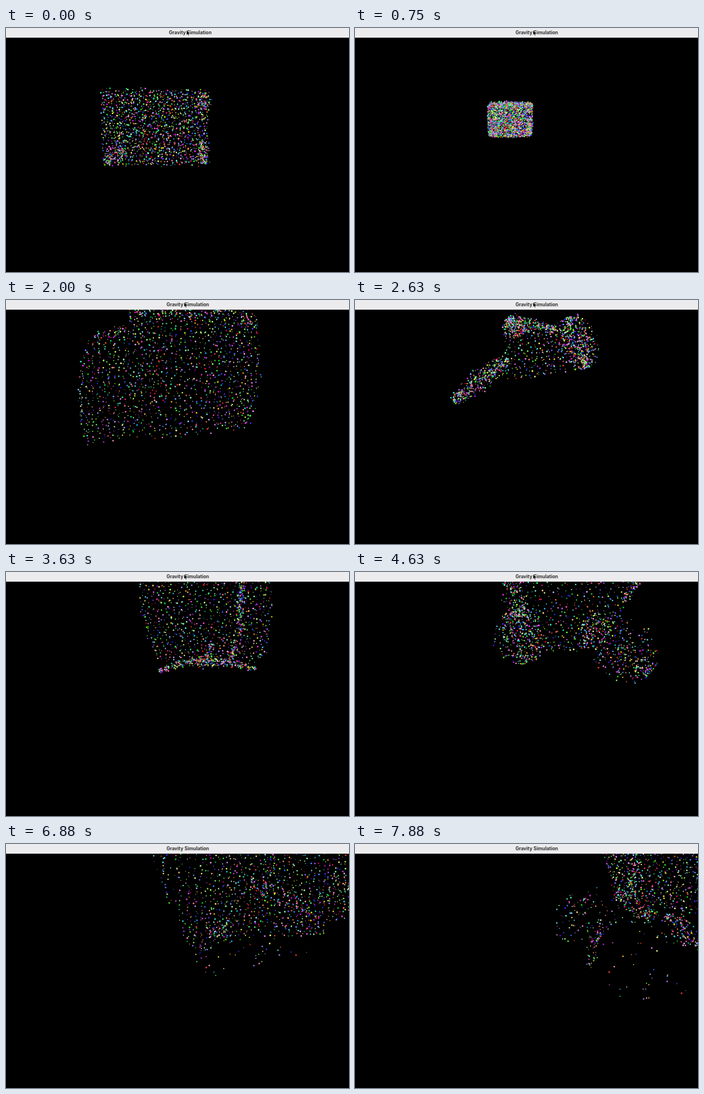
Animation of 600x429 px, one loop 8 s. Source, as an HTML page with a canvas:

```html
<!DOCTYPE html>
<html lang="en">
<head>
<meta charset="utf-8">
<title>Gravity Simulation</title>
<style>
  html, body { margin: 0; width: 100%; height: 100%; overflow: hidden; background: #000; }
  #stage { position: relative; width: 600px; height: 429px; overflow: hidden; background: #000; }
  canvas { position: absolute; left: 0; top: 0; }
  #bar { position: absolute; left: 0; top: 0; width: 600px; height: 17px; background: #ecebed; }
  #title {
    position: absolute; left: 218px; top: 0; width: 200px; text-align: center;
    font: 700 8.3px/16px Inter, "Liberation Sans", sans-serif; color: #303030; white-space: nowrap;
  }
  #cursor { position: absolute; left: 311px; top: 4px; overflow: visible; }
</style>
</head>
<body>
<div id="stage">
  <canvas id="sky" width="600" height="429"></canvas>
  <div id="bar">
    <div id="title">Gravity Simulation</div>
    <svg id="cursor" width="8" height="11">
      <path d="M.5 0V8.3L2.4 6.7 3.7 9.6 5 9 3.8 6.2H6.3Z" fill="#000" stroke="#fff" stroke-width=".5"/>
    </svg>
  </div>
</div>
<script>
const LOOP = 8000, STEP = 125, SIDE = 40, N = SIDE * SIDE;
const ctx = document.getElementById('sky').getContext('2d');
const title = document.getElementById('title');
const cursor = document.getElementById('cursor');

let seed = 20417;
function rnd() {
  seed = (seed + 0x6D2B79F5) | 0;
  let r = Math.imul(seed ^ seed >>> 15, 1 | seed);
  r = r + Math.imul(r ^ r >>> 7, 61 | r) ^ r;
  return ((r ^ r >>> 14) >>> 0) / 4294967296;
}
const spread = size => (rnd() + rnd() - 1) * size;
const lerp = (a, b, s) => a + (b - a) * s;

// An evenly filled four-cornered cloud (clockwise from top left), sides bulging outwards.
const sheet = (a, b, c, d, bulge = 0) => i => {
  const u = i * 0.754877 % 1, v = i * 0.569840 % 1;
  const at = k => lerp(lerp(a[k], b[k], u), lerp(d[k], c[k], u), v);
  return [
    at(0) + bulge * 4 * v * (1 - v) * (2 * u - 1) + spread(4),
    at(1) + bulge * 4 * u * (1 - u) * (2 * v - 1) + spread(4)
  ];
};

// A soft lens-shaped streak between two points; its share of dots follows its area.
function strand([x0, y0], [x1, y1], width, { bend = 0, density = 1 } = {}) {
  const dx = x1 - x0, dy = y1 - y0, len = Math.hypot(dx, dy);
  return {
    weight: len * width * density,
    at() {
      const s = rnd(), arch = Math.sin(Math.PI * s);
      const off = spread(width * (0.4 + 0.4 * arch)) + bend * arch;
      return [x0 + dx * s - dy / len * off, y0 + dy * s + dx / len * off];
    }
  };
}

// Fill the sheet and strands with N dots, then order them by column and row,
// so equal ranks in two poses lie in matching parts of the cloud.
function pose(sheetShare, base, ...strands) {
  const area = strands.reduce((sum, p) => sum + p.weight, 0);
  const points = [];
  for (const p of strands) {
    const count = Math.round(N * (1 - sheetShare) * p.weight / area);
    for (let i = 0; i < count; i++) points.push(p.at());
  }
  for (let i = 1; points.length < N; i++) points.push(base(i));
  points.sort((a, b) => a[0] - b[0]);
  const ranked = [];
  for (let i = 0; i < N; i += SIDE)
    ranked.push(...points.slice(i, i + SIDE).sort((a, b) => a[1] - b[1]));
  return ranked;
}

const block = pose(0.84,
  sheet([166, 107], [354, 110], [354, 240], [169, 242]),
  strand([345, 114], [347, 144], 20),
  strand([342, 200], [346, 239], 22),
  strand([174, 236], [206, 213], 22));

const disc = pose(0.87,
  sheet([164, 40], [405, 40], [396, 248], [160, 252], 14),
  strand([170, 42], [400, 42], 20),
  strand([393, 38], [407, 56], 24));

const wings = pose(0.14,
  sheet([264, 38], [362, 46], [368, 126], [262, 142]),
  strand([373, 30], [404, 120], 48),
  strand([266, 32], [294, 60], 38),
  strand([268, 36], [352, 52], 18),
  strand([268, 103], [172, 178], 28));

const dome = pose(0.68,
  sheet([240, -40], [450, -40], [452, 152], [262, 152], 16),
  strand([267, 174], [437, 171], 13, { bend: -16 }),
  strand([412, 12], [410, 112], 11),
  strand([362, 126], [345, 156], 10),
  strand([402, 120], [392, 158], 10));

const split = pose(0.34,
  sheet([260, -50], [540, -50], [430, 135], [310, 140]),
  strand([268, 8], [290, 80], 30),
  strand([276, 68], [307, 158], 66),
  strand([404, 84], [518, 176], 78, { density: 0.6 }),
  strand([496, 10], [470, 52], 16));

const sail = pose(0.78,
  sheet([190, -60], [640, -60], [556, 138], [284, 210]),
  strand([432, 10], [416, 74], 14),
  strand([384, 63], [522, 106], 16),
  strand([516, 106], [582, 48], 18),
  strand([282, 206], [345, 180], 28));

const drift = pose(0.62,
  sheet([420, -40], [690, -40], [670, 140], [452, 92]),
  strand([493, 8], [482, 95], 15),
  strand([452, 88], [524, 130], 28),
  strand([545, 124], [606, 180], 30),
  strand([370, 95], [432, 165], 85, { density: 0.25 }),
  strand([428, 135], [411, 218], 16, { density: 0.6 }),
  strand([515, 110], [515, 280], 140, { density: 0.04 }));

// Swell: how far the cloud grows (or collapses) on its way to the next pose.
const keys = [
  { t: 0, points: block, swell: -0.65 },
  { t: 1375, points: disc, swell: 0.23 },
  { t: 2625, points: wings, swell: -0.25 },
  { t: 3625, points: dome, swell: 0.08 },
  { t: 4625, points: split, swell: 0 },
  { t: 5875, points: sail, swell: 0 },
  { t: 7875, points: drift, swell: 0 }
];
for (const key of keys)
  key.mid = [0, 1].map(c => key.points.reduce((sum, p) => sum + p[c], 0) / N);

const dots = Array.from({ length: N }, () => ({
  r: 0.6 + rnd() * 0.95,
  color: `hsl(${rnd() * 360} ${60 + rnd() * 40}% ${38 + rnd() * 42}%)`
}));

function draw(t) {
  let k = 0;
  while (k < keys.length - 2 && t >= keys[k + 1].t) k++;
  const from = keys[k], to = keys[k + 1];
  const s = (t - from.t) / (to.t - from.t);
  const ease = s ** 1.5;
  const scale = 1 + from.swell * Math.sin(Math.PI * s) ** 2;
  const place = (i, c) => {
    const mid = lerp(from.mid[c], to.mid[c], ease);
    return mid + (lerp(from.points[i][c], to.points[i][c], ease) - mid) * scale;
  };
  ctx.fillStyle = '#000';
  ctx.fillRect(0, 0, 600, 429);
  dots.forEach((dot, i) => {
    ctx.fillStyle = dot.color;
    ctx.beginPath();
    ctx.arc(place(i, 0), place(i, 1), dot.r, 0, Math.PI * 2);
    ctx.fill();
  });
  const shift = 4.3 * Math.max(0, 1 - t / 500);
  title.style.transform = cursor.style.transform = `translateX(${shift}px)`;
  cursor.style.visibility = t < 5000 ? 'visible' : 'hidden';
}

let start = null, shown = 0;
function tick(now) {
  if (start === null) start = now;
  const t = Math.floor((now - start) % LOOP / STEP) * STEP;
  if (t !== shown) draw(shown = t);
  requestAnimationFrame(tick);
}
draw(0);
requestAnimationFrame(tick);
</script>
</body>
</html>
```
